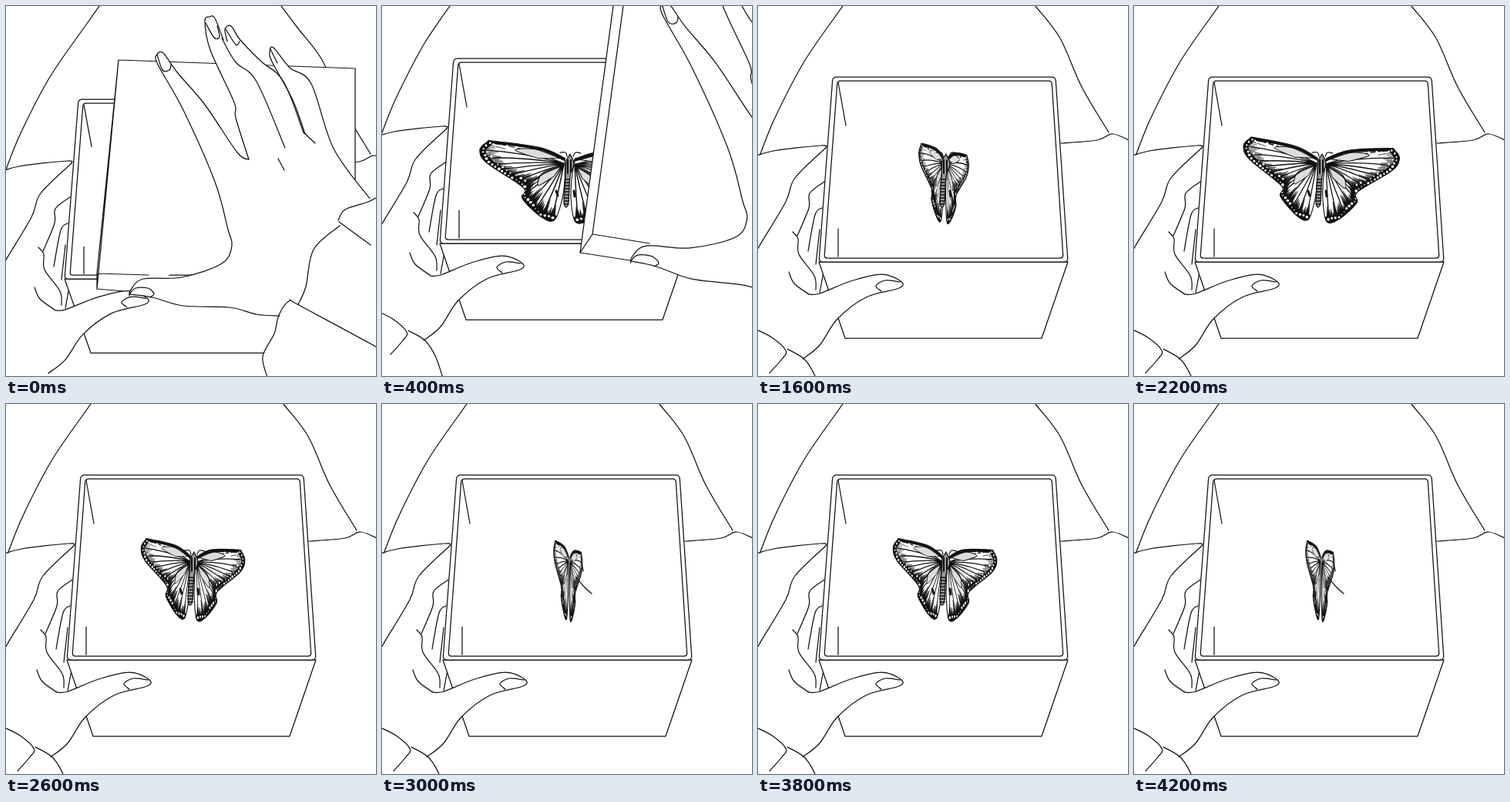
Recreate the animation shown at these times as an HTML page. Size 480x480 px, loop 4.4 s.

```html
<!DOCTYPE html>
<html lang="en">
<head>
<meta charset="utf-8">
<title>Butterfly in a box</title>
<style>
  html, body { margin: 0; width: 100%; height: 100%; overflow: hidden; background: #fff; }
  svg { display: block; width: 100vw; height: 100vh; }
  .ink path, .edge { vector-effect: non-scaling-stroke; }
</style>
</head>
<body>
<svg id="stage" viewBox="0 0 480 480" fill="none" stroke="#111" stroke-width="1.25"
     stroke-linecap="round" stroke-linejoin="round"></svg>
<script>
const STEP = 200, COUNT = 22;
const WHITE = 'fill="#fff" stroke="none"';
const stage = document.getElementById('stage');

const r1 = n => Math.round(n * 10) / 10;
const mix = (a, b, k) => a + (b - a) * k;
const add = (p, x, y) => [p[0] + x, p[1] + y];
const pts = s => s.trim().split(/\s+/).map(p => p.split(',').map(Number));
const path = (d, attr = '') => `<path d="${d}" ${attr}/>`;

// Smooth path through a few key points
function curve(s) {
  const p = pts(s);
  let d = 'M' + p[0];
  for (let i = 0; i < p.length - 1; i++) {
    const a = p[i - 1] || p[i], b = p[i], c = p[i + 1], e = p[i + 2] || c;
    const c1 = [0, 1].map(k => r1(b[k] + (c[k] - a[k]) / 6));
    const c2 = [0, 1].map(k => r1(c[k] - (e[k] - b[k]) / 6));
    d += `C${c1} ${c2} ${c}`;
  }
  return d;
}
const curves = (...list) => list.map(s => path(curve(s))).join('');

// Point at distance d from p on the way to c
function toward(p, c, d) {
  const k = d / (Math.hypot(c[0] - p[0], c[1] - p[1]) || 1);
  return [r1(mix(p[0], c[0], k)), r1(mix(p[1], c[1], k))];
}
function rounded(corners, r) {
  const n = corners.length;
  return 'M' + corners.map((p, i) =>
    `${toward(p, corners[(i + n - 1) % n], r)}Q${p} ${toward(p, corners[(i + 1) % n], r)}`).join('L') + 'Z';
}

/* ---- person, box and the hand that holds it ---- */
const bodyLeft = curves('134,-34 110,0 60,72 22,145 3,192');
const bodyRight = curves('336,-32 360,0 392,42 420,105 455,164',
  '393,178 440,174 460,166 484,175 500,178');

const fingers = curves(
  '-12,198 20,188 82,181 88,184',
  '88,184 48,223 36,254 2,311 -8,330',
  '86,228 67,243 66,262 51,298',
  '83,262 74,271 65,318',
  '80,290 75,335',
  '45,293 52,302 53,322 73,350 75,368',
  '85,345 80,372',
  '40,345 47,360 66,374');

const thumbEdge = curve('66,374 80,373 120,357 160,348 185,357 183,366 140,378 103,406 80,440 58,458');
const thumb = path(thumbEdge, WHITE) + path(thumbEdge) + curves('184,358 165,356 153,363 160,370');
const cuff = curves('-6,418 18,430 36,447 31,458 15,476', '38,445 60,458 74,480 84,510');

const rim = [[97, 92], [386, 92], [402, 332], [79, 332]];
const inside = [[103, 97], [381, 97], [396, 327], [86, 327]];
const box = path(`M${rim[3]}L113,431L368,431L${rim[2]}Z`, 'fill="#fff"') +
  path(rounded(rim, 5), 'fill="#fff"') + path(rounded(inside, 4)) +
  path('M104,99L114,155M104,289V325');

/* ---- the hand that lifts the lid ---- */
const edges = [
  '160,376 162,368 178,354 228,352 280,334 293,311 288,290 271,228 230,135 197,76 196,63 204,61 222,86 258,128 300,190 315,199',
  '315,199 298,145 296,125 265,57 258,20 264,14 271,16 282,44',
  '287,46 284,30 292,26 303,43 330,71 360,98 386,164',
  '388,166 372,122 346,74 342,60 347,54 368,80 396,101 425,185 472,250'
].map(curve);
const palm = curve('355,402 325,400 290,391 230,389 190,378 160,374');
const handFill = 'M' + edges.concat('M480,247L700,240V700H340L333,455', palm)
  .join('').replace(/M/g, 'L').slice(1) + 'Z';
const hand = path(handFill, WHITE) + edges.concat(palm).map(d => path(d)).join('') + curves(
  '280,42 298,73 325,98 362,184',
  '386,164 401,178',
  '353,198 361,213',
  '196,63 203,83 212,83 214,76',
  '259,22 270,41 277,40 274,26',
  '285,30 298,50 303,46',
  '343,56 352,74',
  '160,374 168,366 184,366 192,373 187,378',
  '490,243 470,254 440,264 431,278',
  '432,280 473,310',
  '433,285 399,316 389,364 379,387',
  '340,484 333,455 348,425 354,401 367,383 380,388 480,442');

/* ---- lid: k runs from closed to lifted ---- */
function lid(k, dx, dy) {
  const lip = [mix(118, 257, k) + dx, mix(367, 320, k) + dy];
  const fold = add(lip, 16 * k, mix(-20, -24, k));
  const lipEnd = add(lip, mix(47, 71, k), mix(4, 11, k));
  const foldEnd = add(fold, mix(67, 74, k), mix(2, 12, k));
  const inTop = add(fold, mix(28, 44, k), mix(-277, -326, k));
  const top = add(inTop, -13 * k, 0);
  const right = add(top, mix(307, 400, k), 11);
  const low = add(right, 0, mix(154, 300, k));
  return path(`M${top}L${lip}L${lipEnd}L${low}L${right}Z`, WHITE) +
    path(`M${lipEnd}L${lip}L${top}L${right}L${low}M${inTop}L${fold}L${foldEnd}M${fold}L${lip}`);
}
const lifter = (k, dx, dy) =>
  `<g transform="matrix(${1 + .135 * k} ${.1 * k} 0 ${1 + .08 * k} ${141 * k + dx} ${dy - 89 * k})">${hand}</g>`;

/* ---- butterfly ---- */
let seed = 7;
const rnd = (a, b) => mix(a, b, (seed = seed * 16807 % 2147483647) / 2147483647);

// Evenly spaced points on a polyline
function along(list, step) {
  const out = [];
  let at = 0;
  for (let i = 1; i < list.length; i++) {
    const a = list[i - 1], b = list[i];
    const len = Math.hypot(b[0] - a[0], b[1] - a[1]);
    for (; at < len; at += step) out.push(toward(a, b, at));
    at -= len;
  }
  return out;
}

function makeWing() {
  const root = [237, 204];
  const front = '238,197 210,182 158,171';
  const margin = '150,172 142,182 150,199 191,233 190,247 210,271 226,277';
  const shape = curve(`${front} ${margin} 235,250 238,225`) + 'Z';
  const rimPts = pts(margin);
  const veins = along(rimPts, 12).map((p, i) =>
    `M${root}Q${mix(p[0], root[0], .5)},${mix(p[1], root[1], .5) - 7 + i} ${p}`).join('');
  const spikes = along(rimPts, 2.8).map(p =>
    `M${add(p, -2, -1)}L${toward(p, root, rnd(9, 25))}L${add(p, 2, 1)}Z`).join('');
  const spot = (p, inset) => {
    const [x, y] = toward(p, root, inset);
    return `<circle cx="${x}" cy="${y}" r="${r1(rnd(.7, 1.9))}"/>`;
  };
  const spots = along(rimPts, 5).map(p => spot(p, rnd(2, 4))).join('') +
    along(rimPts, 7).slice(0, 12).map(p => spot(p, rnd(7, 10))).join('') +
    along(pts('148,175 185,180'), 8).map(p => spot(p, rnd(1, 4))).join('');
  const cells = ['232,197 205,184 182,184 208,196', '234,207 213,215 208,231 226,220']
    .map(c => path(curve(c) + 'Z', 'fill="#ddd" stroke-width="1"')).join('');
  return `<clipPath id="wing"><path d="${shape}"/></clipPath>` + path(shape, WHITE) +
    '<g clip-path="url(#wing)">' + path(veins, 'stroke-width="1.3"') + cells +
    path(spikes, 'fill="#111" stroke-width=".4"') +
    path(curve(margin), 'stroke-width="13"') + path(curve(front), 'stroke-width="7"') +
    path(curve('237,206 214,216 192,234'), 'stroke-width="1.6"') +
    `<g fill="#fff" stroke="none">${spots}</g></g>` +
    path(shape, 'class="edge" stroke-width="1.1"');
}
const wing = makeWing();
// Mirrored over the leaning body, hanging a little lower
const farWing = `<g transform="matrix(-1 -.16 -.14 1 515 38.9)">${wing}</g>`;

const rings = Array.from({ length: 9 }, (_, i) => `M${237 - i * .1},${225 + i * 4}h6`).join('');
const insect = curves('240,195 238,190 231,190', '248,195 251,190 258,191') +
  path(curve('244,192 249,205 244,221 242,254 239,261 236,254 238,221 239,200') + 'Z', 'fill="#999"') +
  path(rings, 'stroke-width="1.6"') +
  path('M241,200V217M245,200V215', 'stroke-width="2"') +
  path('M226,240l2,6M249,240l1,7', 'stroke-width="3"');
const legs = curves('259,205 261,217', '252,225 263,238 272,246');

// Near width, far width, drop of the tips
const POSES = [[1, .97, 0], [.85, .83, .02], [.67, .64, .05], [.34, .29, .09], [.2, .16, .08], [1.15, 1.1, .05]];
const FOLDED = 4, WIDE = 5;

function butterfly(n) {
  const [near, far, drop] = POSES[n];
  const place = (s, k, part) =>
    `<g transform="matrix(${s} ${k} 0 1 ${243 * (1 - s)} ${-243 * k})">${part}</g>`;
  return place(far, drop, farWing) + place(near, -drop, wing) + (n === FOLDED ? legs : insect);
}

/* ---- scenes ---- */
// Shift of arm, shift and height of box, shift of far shoulder, lid progress and travel
const OPENING = [
  { arm: [-3, 20], box: [-3, 32, .97], side: [18, 28], lid: [0, 0, 0] },
  { arm: [-3, -2], box: [-3, 3, .99], side: [8, 2], lid: [.5, 0, 0] },
  { arm: [-4, -25], box: [-4, -24, 1], side: [-4, -25], lid: [1, 0, 0] },
  { lid: [1, 95, 25] },
  { lid: [1, 160, 62] }
];
const REST = { arm: [0, 0], box: [0, 0, 1], side: [0, 0] };

const shift = ([x, y, sy = 1], s) => `<g transform="matrix(1 0 0 ${sy} ${x} ${y})">${s}</g>`;
const ink = s => `<g class="ink">${s}</g>`;

function scene(i) {
  const o = { ...REST, ...OPENING[i] };
  const pose = i < OPENING.length ? WIDE : (i - OPENING.length) % POSES.length;
  const covered = i === 0;
  return ink(shift(o.side, bodyRight) + shift(o.arm, bodyLeft + fingers) + shift(o.box, box)) +
    (covered ? '' : butterfly(pose)) +
    ink((o.lid ? lid(...o.lid) : '') +
      shift(o.box, thumb + (covered ? '' : cuff)) +
      (o.lid ? lifter(...o.lid) : ''));
}

let shown = -1;
const start = performance.now();
function tick(now) {
  const i = Math.floor(Math.max(0, now - start) / STEP) % COUNT;
  if (i !== shown) stage.innerHTML = scene(shown = i);
  requestAnimationFrame(tick);
}
tick(start);
</script>
</body>
</html>
```
